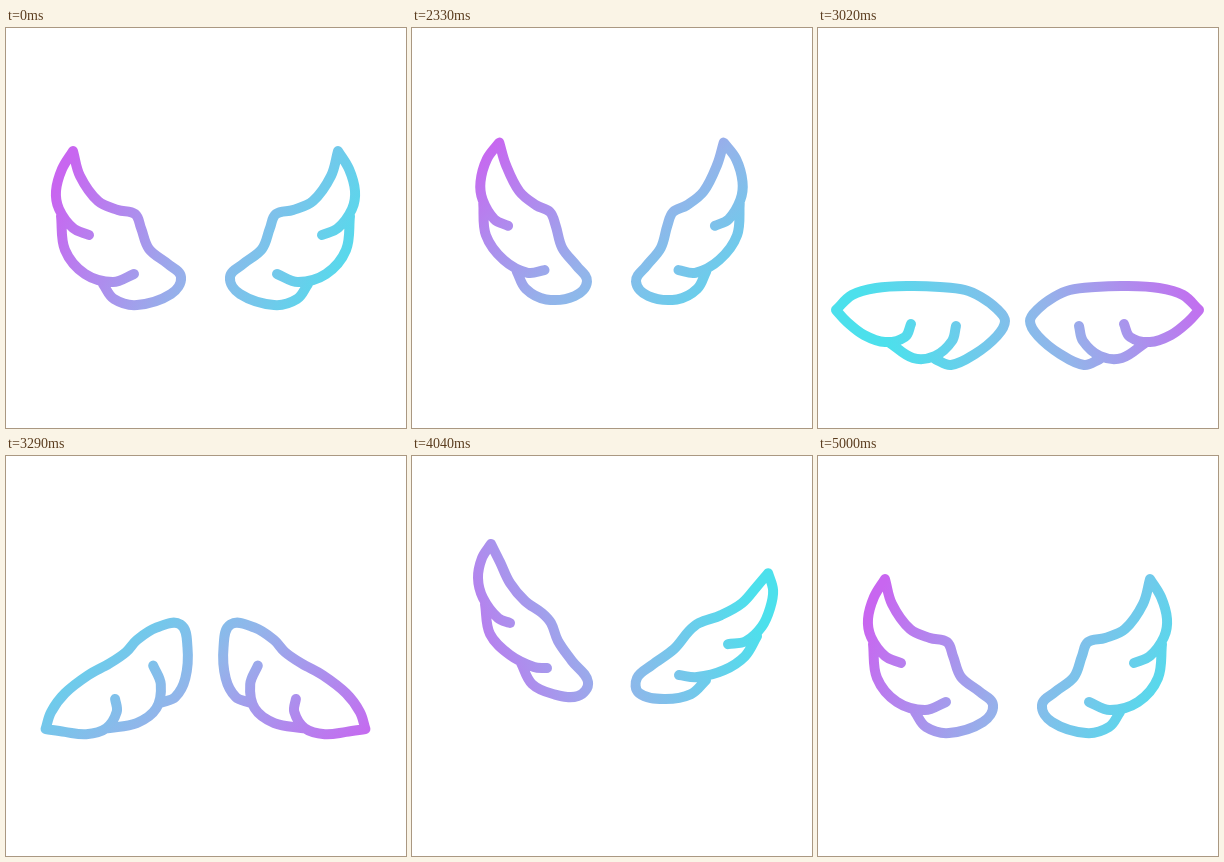
An HTML page with a canvas for the animation above (5120 ms loop, 400x400 px).

```html
<!DOCTYPE html>
<html lang="en">
<head>
<meta charset="utf-8">
<title>Flapping wings</title>
<style>
html, body { margin: 0; width: 100%; height: 100%; overflow: hidden; background: #fff; }
canvas { display: block; }
</style>
</head>
<body>
<canvas id="stage" width="400" height="400"></canvas>
<script>
const ctx = document.getElementById('stage').getContext('2d');
const LOOP = 5120, MOVE = 2030, END = 5000, STEP = 30;

// Left wing poses as x,y pairs: first feather to the tip, leading edge round
// the shoulder to the third feather, then the second feather.
const REST = [83,207, 67,200, 53,181, 50,163, 56,141, 67,123,
  74,148, 92,173, 112,182, 129,186, 135,200, 143,221, 162,236, 175,249, 165,266, 131,277, 108,271, 97,256,
  128,246, 107,254, 79,246, 59,222, 55,188];
const FOLDED = [112,216, 101,210, 92,190, 91,172, 98,148, 112,134,
  118,152, 126,181, 139,202, 149,213, 154,225, 159,250, 168,272, 175,290, 160,302, 138,295, 121,278, 114,256,
  138,268, 126,263, 107,243, 92,217, 91,188];
const SPREAD = [93,296, 87,309, 67,314, 46,307, 29,294, 18,282,
  34,267, 58,260, 92,258, 122,259, 147,262, 163,269, 179,281, 187,293, 179,308, 157,326, 133,337, 117,331,
  138,298, 134,313, 117,328, 95,330, 72,315];
const DROOP = [95,292, 95,305, 83,320, 62,325, 40,322, 20,317,
  27,302, 43,284, 68,266, 89,255, 106,246, 119,234, 143,223, 171,224, 175,250, 169,282, 158,299, 144,303,
  139,264, 144,285, 136,309, 114,320, 83,320];
const LIFT = [83,188, 65,185, 49,170, 41,152, 38,134, 43,117,
  54,130, 69,147, 90,159, 112,167, 122,175, 137,193, 159,209, 174,222, 172,237, 147,243, 120,238, 105,224,
  132,219, 114,221, 87,214, 66,200, 54,180];
const RAISED = [98,167, 86,162, 71,142, 66,122, 70,102, 79,88,
  88,106, 98,127, 113,145, 130,157, 139,167, 146,185, 160,205, 176,226, 166,240, 141,238, 120,228, 109,207,
  135,212, 122,211, 98,199, 78,178, 73,148];
const TIP = 5, SHOULDER = 13, ROOT = 17;

const mix = (a, b, u) => a.map((v, i) => v + (b[i] - v) * u);

// Rotate and scale a pose about its shoulder, then shift it vertically.
function turn(pose, deg, dy = 0, scale = 1) {
  const a = deg * Math.PI / 180, c = Math.cos(a) * scale, s = Math.sin(a) * scale;
  const cx = pose[SHOULDER * 2], cy = pose[SHOULDER * 2 + 1];
  return pose.map((v, i) => {
    const x = pose[i & ~1] - cx, y = pose[i | 1] - cy;
    return i % 2 ? cy + dy + x * s + y * c : cx + x * c - y * s;
  });
}

const flap = [
  [1990, REST],
  [2300, turn(mix(REST, FOLDED, 0.4), 0, -13)],
  [2630, FOLDED],
  [2820, turn(FOLDED, -25, 55)],
  [3020, SPREAD],
  [3150, turn(SPREAD, -8, -55, 1.08)],
  [3350, turn(DROOP, -15, -68)],
  [3560, DROOP],
  [3740, turn(LIFT, -35, 15, 1.03)],
  [3957, LIFT],
  [4040, RAISED],
  [4180, turn(RAISED, 3, -6)],
  [END, REST]
];
const spin = [[1990, [205]], [2630, [270]], [3020, [335]], [3560, [474]], [4040, [520]], [END, [565]]];

// Smooth interpolation through keys without overshoot.
function at(keys, t) {
  t = Math.max(keys[0][0], Math.min(END, t));
  let i = 0;
  while (i < keys.length - 2 && t >= keys[i + 1][0]) i++;
  const h = keys[i + 1][0] - keys[i][0], u = (t - keys[i][0]) / h;
  const rate = (k, n) => (keys[k + 1][1][n] - keys[k][1][n]) / (keys[k + 1][0] - keys[k][0]);
  const slope = (k, n) => {
    if (k === 0 || k === keys.length - 1) return 0;
    const a = rate(k - 1, n), b = rate(k, n);
    return a * b > 0 ? 2 * a * b / (a + b) : 0;
  };
  return keys[i][1].map((p, n) => {
    const q = keys[i + 1][1][n], v = 1 - u;
    return p * v * v * (1 + 2 * u) + q * u * u * (3 - 2 * u)
      + h * u * v * (slope(i, n) * v - slope(i + 1, n) * u);
  });
}

function curve(pts) {
  const last = pts.length - 1;
  const dir = i => {
    const a = pts[Math.max(0, i - 1)], b = pts[Math.min(last, i + 1)];
    const d = Math.hypot(b[0] - a[0], b[1] - a[1]) || 1;
    return [(b[0] - a[0]) / d, (b[1] - a[1]) / d];
  };
  for (let i = 0; i < last; i++) {
    const [x, y] = pts[i], [X, Y] = pts[i + 1];
    const k = Math.hypot(X - x, Y - y) * 0.35, d = dir(i), e = dir(i + 1);
    ctx.bezierCurveTo(x + d[0] * k, y + d[1] * k, X - e[0] * k, Y - e[1] * k, X, Y);
  }
}

function wing(pose, mirror) {
  const pts = [];
  for (let i = 0; i < pose.length; i += 2) pts.push([mirror ? 399 - pose[i] : pose[i], pose[i + 1]]);
  ctx.beginPath();
  ctx.moveTo(...pts[0]);
  curve(pts.slice(0, TIP + 1));
  curve(pts.slice(TIP, ROOT + 1));
  ctx.moveTo(...pts[ROOT + 1]);
  curve(pts.slice(ROOT + 1));
  ctx.stroke();
}

function draw(now) {
  let t = now % LOOP;
  t = t < MOVE ? 0 : MOVE + Math.floor((t - MOVE) / STEP) * STEP;
  const a = at(spin, t)[0] * Math.PI / 180, dx = 160 * Math.cos(a), dy = 160 * Math.sin(a);
  const paint = ctx.createLinearGradient(200 + dx, 220 + dy, 200 - dx, 220 - dy);
  paint.addColorStop(0, '#c866f0');
  paint.addColorStop(0.5, '#93b4ea');
  paint.addColorStop(1, '#4ce0ec');
  ctx.fillStyle = '#fff';
  ctx.fillRect(0, 0, 400, 400);
  ctx.strokeStyle = paint;
  ctx.lineWidth = 10;
  ctx.lineCap = ctx.lineJoin = 'round';
  // The right wing trails the left on the way up.
  const u = Math.max(0, Math.min(1, (t - 3400) / 1400));
  const lag = 85 * Math.sin(Math.PI * u) ** 2;
  wing(at(flap, t), false);
  wing(at(flap, t - lag), true);
}

const start = performance.now();
function tick() {
  draw(performance.now() - start);
  requestAnimationFrame(tick);
}
tick();
</script>
</body>
</html>
```
